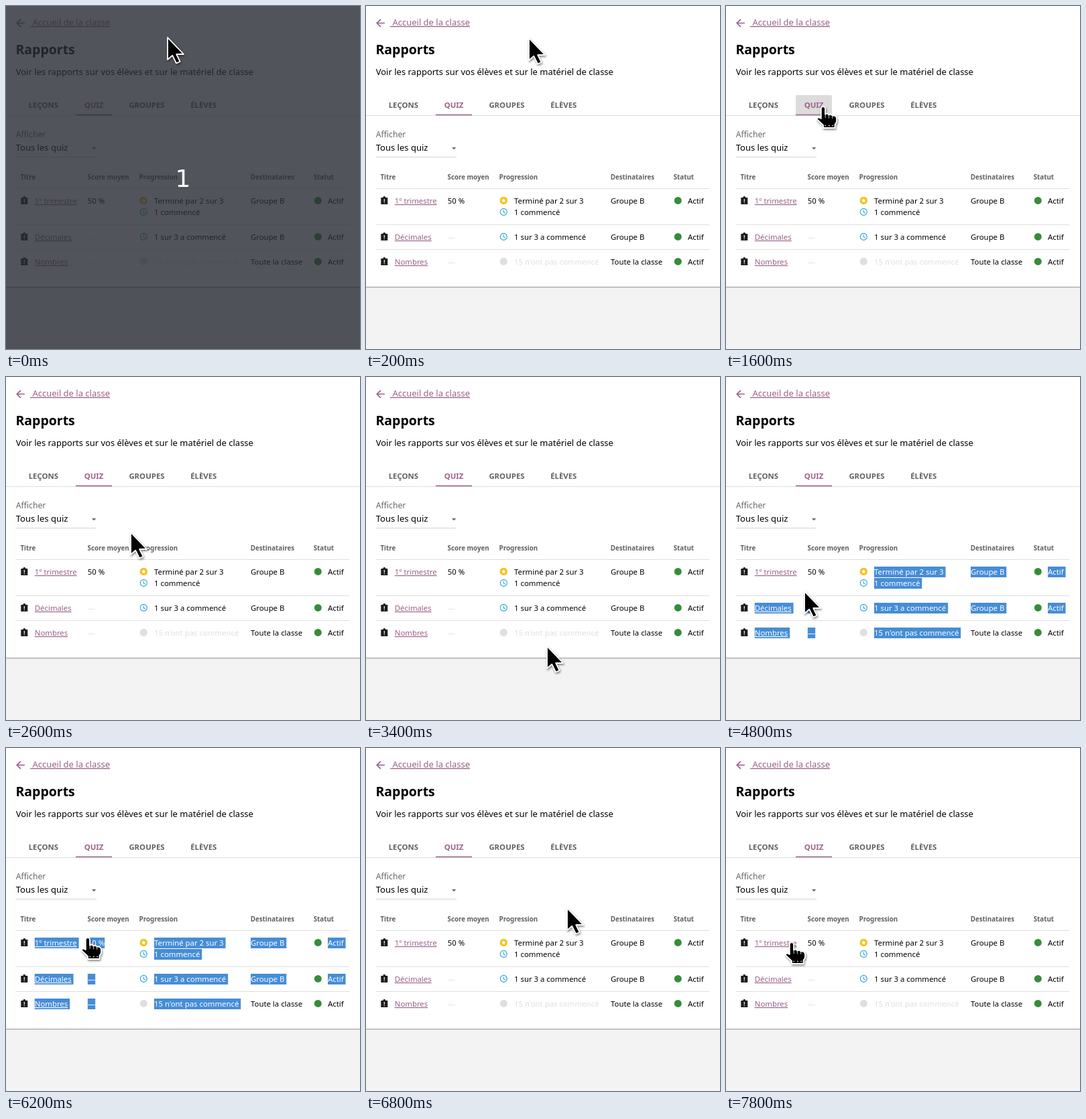
These frames come from a looping animation (528x512 px, 8 s). An HTML page:

```html
<!DOCTYPE html>
<html lang="fr">
<head>
<meta charset="utf-8">
<title>Rapports</title>
<style>
  html, body { margin: 0; width: 100%; height: 100%; overflow: hidden; background: #f3f3f3; }
  svg { display: block; }
  text { font-family: "Noto Sans", sans-serif; font-size: 11.375px; white-space: pre; }
  .body { font-size: 13px; }
  .title { font-size: 19.5px; font-weight: 700; }
  .label { font-size: 12.19px; fill: #686868; }
  .tab { font-weight: 700; fill: #616161; }
  .head { font-size: 9.75px; font-weight: 700; fill: #616161; }
  .link { fill: #996189; text-decoration: underline; text-decoration-color: #996189; }
  .active { fill: #996189; }
  .faint { fill: #dfdfdf; }
  .cell rect { fill: #468dd7; visibility: hidden; }
  .selected rect { visibility: visible; }
  .selected text { fill: #fff; }
  .count { font: 36px "DejaVu Sans", sans-serif; fill: #fff; text-anchor: middle; }
  #cursor { filter: drop-shadow(1px 2px 1.5px rgba(0, 0, 0, .45)); }
  #cursor path { stroke: #fff; stroke-width: 1.8; stroke-linejoin: round; }
</style>
</head>
<body>
<svg id="stage" width="528" height="512" viewBox="0 0 528 512">
  <defs>
    <g id="badge">
      <path d="M-5-4H-2A2 2 0 0 1 2-4H5V6H-5Z" fill="#1c1c1c"/>
      <path d="M0-2V2M0 3V4.3" stroke="#fff" stroke-width="1.2"/>
    </g>
    <g id="clock" fill="none" stroke="#28a4d8" stroke-width="1.1">
      <circle r="5"/><path d="M0-3V.3L2.4 1.8"/>
    </g>
    <g id="star">
      <circle r="5.7" fill="#f5c21c"/>
      <path d="M0-3.6L1-1.2L3.5-1L1.6.7L2.2 3.1L0 1.8L-2.2 3.1L-1.6.7L-3.5-1L-1-1.2Z" fill="#fff"/>
    </g>
    <circle id="pending" r="5.6" fill="#dfdfdf"/>
    <circle id="status" r="5.5" fill="#358d39"/>
  </defs>
  <rect width="528" height="512" fill="#f3f3f3"/>
  <rect y="419" width="528" height="1.2" fill="#a2a2a2"/>
  <rect y="420.2" width="528" height="1" fill="#e3e3e3"/>
  <rect width="528" height="419" fill="#fff"/>
  <path d="M28 25.5H16.5M22 19.8L16.3 25.5L22 31.2" fill="none" stroke="#996189" stroke-width="1.7"/>
  <path id="hover" d="M104 163V135a2 2 0 0 1 2-2H156a2 2 0 0 1 2 2V163Z" fill="#dcdcdc"/>
  <path d="M0 163.5H528M15 272.5H512M15 326.5H512M15 363.5H512" stroke="#dedede"/>
  <path d="M104 162.5H158" stroke="#996189" stroke-width="1.6"/>
  <path d="M15 225.5H135" stroke="#d4d4d4"/>
  <path d="M128 211H134.4L131.2 214.2Z" fill="#686868"/>
  <g id="content"></g>
  <g id="countdown">
    <rect width="528" height="512" fill="rgb(41,45,53)" fill-opacity=".81"/>
    <text class="count" x="264" y="270">1</text>
  </g>
  <g id="cursor">
    <path id="arrow" d="M0 0V33L7.3 26.8L13 38.5L18.6 36L13.2 25H24Z"/>
    <g id="hand">
      <path d="M-3.2 17V3.2a3.1 3.1 0 0 1 6.2 0V11.5Q6.5 9.3 8.3 12.5Q11.8 10.5 13.6 13.7Q19.5 12.5 20 18V23L17.5 27V32H0V28L-9 19.5Q-9.5 14.5-3.2 18Z"/>
      <path d="M3.2 12V17M8.4 13V17.5M13.7 14V18" style="stroke-width:.8"/>
      <path d="M2.5 28.5H16" stroke-dasharray="1.5 4" style="stroke-width:1.5"/>
    </g>
  </g>
</svg>
<script>
const byId = id => document.getElementById(id);
const content = byId("content");

function add(parent, tag, attrs, label = "") {
  const node = document.createElementNS("http://www.w3.org/2000/svg", tag);
  for (const name in attrs) node.setAttribute(name, attrs[name]);
  node.textContent = label;
  return parent.appendChild(node);
}
const write = (label, x, y, style, parent = content) =>
  add(parent, "text", { x, y, class: style }, label);
const icon = (name, x, y) =>
  add(content, "use", { href: "#" + name, transform: `translate(${x} ${y})` });

write(" Accueil de la classe", 36, 29, "body link");
write("Rapports", 14.4, 72, "title");
write("Voir les rapports sur vos élèves et sur le matériel de classe", 14.7, 103, "body");
write("LEÇONS", 33.7, 152, "tab");
write("QUIZ", 116.7, 152, "tab active");
write("GROUPES", 183.4, 152, "tab");
write("ÉLÈVES", 275.2, 152, "tab");
write("Afficher", 14.8, 196, "label");
write("Tous les quiz", 14.8, 216, "body");
[["Titre", 21.4], ["Score moyen", 121.6], ["Progression", 198.6], ["Destinataires", 364.8], ["Statut", 458.7]]
  .forEach(([label, x]) => write(label, x, 259, "head"));

// Cells in reading order, so that a selection is a range of indices.
const cells = [];
function cell(lines, x, y, style = "", pad = 2.9) {
  const group = add(content, "g", { class: "cell" });
  lines.forEach((line, i) => {
    const top = y - 12 + 17 * i;
    const box = add(group, "rect", { x, y: top, height: 16 });
    const label = write(line, x, y + 17 * i, style, group);
    box.setAttribute("width", label.getComputedTextLength() + pad);
  });
  cells.push(group);
}
const rows = [
  { y: 295, name: "1º trimestre", score: "50 %", icons: ["star", "clock"],
    progress: ["Terminé par 2 sur 3", "1 commencé"], group: "Groupe B" },
  { y: 349, name: "Décimales", score: "—", icons: ["clock"],
    progress: ["1 sur 3 a commencé"], group: "Groupe B" },
  { y: 386, name: "Nombres", score: "—", icons: ["pending"],
    progress: ["15 n'ont pas commencé"], group: "Toute la classe" }
];
for (const { y, name, score, icons, progress, group } of rows) {
  icon("badge", 27.3, y - 5);
  cell([name], 42.8, y, "link");
  cell([score], 121.8, y, score === "—" ? "faint" : "", 0);
  icons.forEach((id, i) => icon(id, 205.3, y - 4.6 + 17 * i));
  cell(progress, 221, y, icons[0] === "pending" ? "faint" : "");
  cell([group], 365, y);
  icon("status", 465.3, y - 4.6);
  cell(["Actif"], 480, y);
}
const LAST_SELECTED = 12;

// Pointer path: time, x, y
const path = [
  [0, 241, 47], [200, 243, 48], [400, 243, 48], [600, 237, 54], [1400, 148, 147], [1600, 145, 150],
  [2200, 145, 150], [2400, 150, 160], [3000, 258, 376], [3200, 271, 407], [3400, 270, 402],
  [3800, 255, 388], [4600, 140, 329], [4800, 117, 320], [5400, 42, 289], [6000, 42, 289],
  [6200, 122, 283], [6600, 270, 245], [6800, 300, 239], [7000, 300, 239], [7200, 290, 242],
  [7600, 130, 284], [7800, 98, 290], [8000, 98, 290]
];
// First selected cell from each time on
const selection = [[0, 99], [3800, 12], [4200, 8], [4400, 7], [4600, 6], [4800, 2], [5000, 1], [5200, 0], [6600, 99]];

function pointerAt(t) {
  const i = path.findIndex(knot => knot[0] > t);
  const [t0, x0, y0] = path[i - 1], [t1, x1, y1] = path[i];
  const k = (t - t0) / (t1 - t0);
  return [x0 + (x1 - x0) * k, y0 + (y1 - y0) * k];
}
const within = (t, from, to) => t >= from && t < to;
const show = (id, on) => byId(id).style.display = on ? "" : "none";

function render(now) {
  const t = Math.floor(now % 8000 / 200) * 200;
  const [x, y] = pointerAt(t);
  const hand = within(t, 1400, 2600) || within(t, 5400, 6400) || t >= 7800;
  byId("cursor").setAttribute("transform", `translate(${x} ${y})`);
  show("hand", hand);
  show("arrow", !hand);
  show("countdown", t < 200);
  byId("hover").style.opacity = within(t, 1600, 2600) ? 1 : t === 1400 ? .7 : 0;
  const first = selection.filter(([from]) => from <= t).pop()[1];
  cells.forEach((node, i) => node.classList.toggle("selected", i >= first && i <= LAST_SELECTED));
}

const start = performance.now();
function tick() {
  render(performance.now() - start);
  requestAnimationFrame(tick);
}
tick();
</script>
</body>
</html>
```
